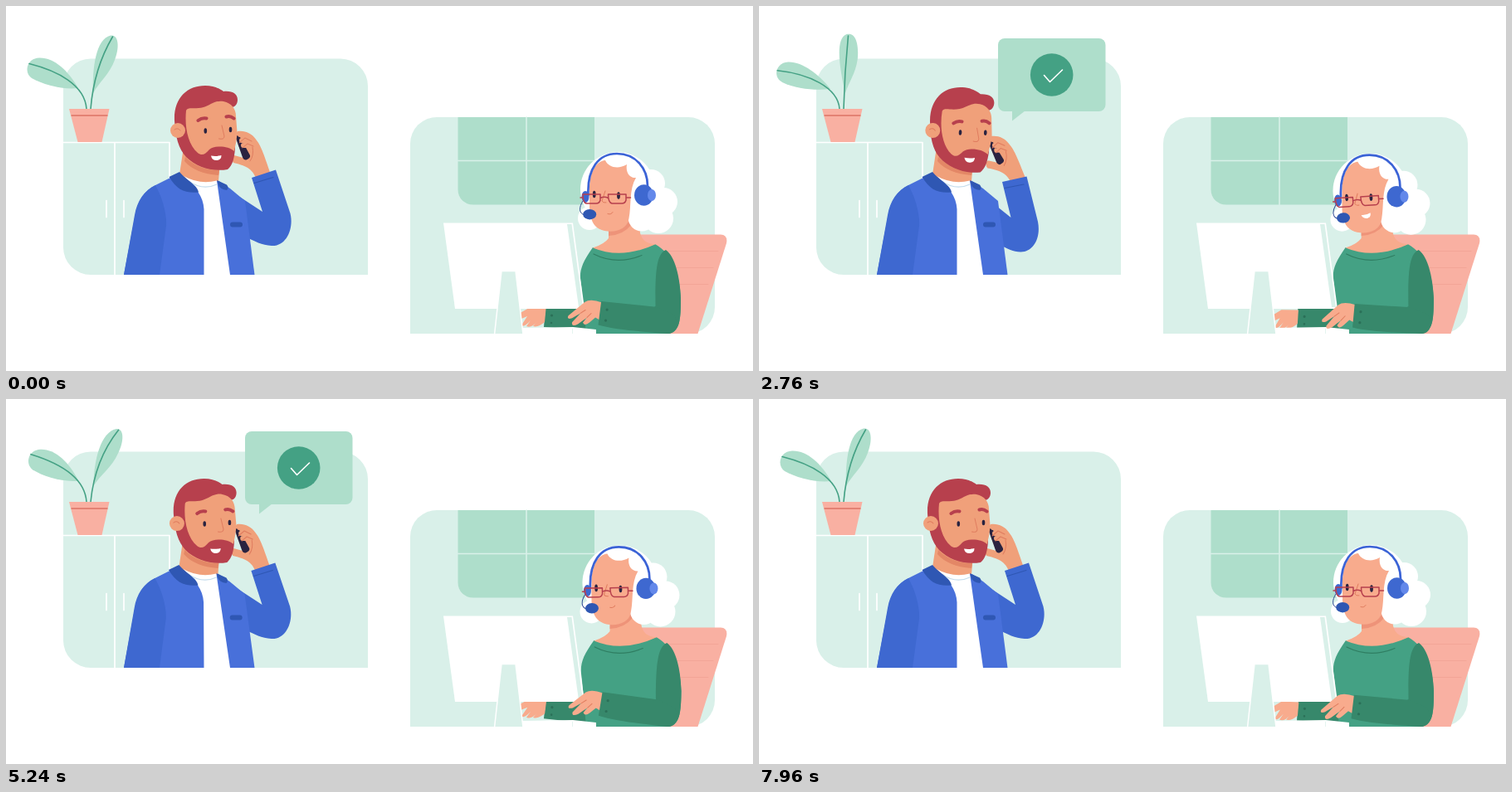
Animation of 900x440 px, one loop 8 s. Source, as an HTML page:

```html
<!DOCTYPE html>
<html lang="en">
<head>
<meta charset="utf-8">
<title>Support call</title>
<style>
html, body { margin: 0; width: 100%; height: 100%; overflow: hidden; background: #fff; }
svg { display: block; width: 900px; height: 440px; }
.line { fill: none; stroke-linecap: round; stroke-linejoin: round; }
.mint { fill: #d9f0e9; }
.leaf { fill: #aedecb; }
.rib { stroke: #44a184; stroke-width: 1.6; }
.coral { fill: #f9b0a2; }
.blue { fill: #4870da; }
.sleeve { fill: #3e68d0; }
.navy { fill: #2f57b3; }
.skin { fill: #f0a07a; }
.red { fill: #b7404d; }
.crease { stroke: #df7c5f; stroke-width: 1; }
.ink { fill: #2a2340; }
.green { fill: #44a184; }
.dark { fill: #37886b; }
.peach { fill: #f8ab8d; }
.white { fill: #fff; }
</style>
</head>
<body>
<svg viewBox="0 0 900 440">
  <!-- left room -->
  <path class="mint" d="M102 63.5H403a33 33 0 0 1 33 33V324H102a33 33 0 0 1-33-33V96.500a33 33 0 0 1 33-33Z"/>
  <path class="line" stroke="#fff" stroke-width="1.7" d="M69 164.500H197V324M131 164.500V324M121 234.500V254.500M142 234.500V254.500"/>
  <path class="leaf" id="leafL"/>
  <path class="line rib" id="ribL"/>
  <path class="leaf" id="leafR"/>
  <path class="line rib" id="ribR"/>
  <path class="coral" d="M76 124H124.500L115.500 164H86.500Z"/>
  <path class="line" stroke="#dd7465" stroke-width="1.4" d="M79 132H122"/>

  <!-- caller -->
  <g id="man">
    <g id="hand">
      <path class="skin" d="M302 210C298 198 292 193 274 189Q270 183 275 180L286 183L280 168Q275 154 279 151C288 150 296 153 302 162C308 170 311 180 319 203Z"/>
      <path class="ink" d="M276.500 158Q277 155.500 281 156L294 180Q295 183 289.500 185.500Q286 186 284.500 181Z"/>
      <path class="line" stroke="#f0a07a" stroke-width="6" d="M282 155L293 158M284 162L296 163M286 168L297 168"/>
      <path class="line crease" d="M281 165L288 159L296 163M285 171L291 166L298 169M297 170Q299 180 294 187"/>
    </g>
    <path class="sleeve" id="arm"/>
    <path class="line" id="cuff" stroke="#2f57b3" stroke-width="1.2"/>
    <path class="blue" d="M142 324L156 250C160 232 168 222 180 216L208 202L255 210L270 220L288 235L299.500 324Z"/>
    <path class="skin" d="M214 170L209 203Q231 220 256 211L258 188Z"/>
    <path fill="#e38766" d="M216 182Q232 198 257 198L256 204Q228 202 215 187Z"/>
    <path class="sleeve" d="M142 324L155 252C158 235 166 223 180 216C188 230 194 250 193 265L185 324Z"/>
    <path class="white" d="M214 205Q234 216 254 210.500L270 324H238.500V245C238 230 228 217 214 205Z"/>
    <path class="line" stroke="#c4dcec" stroke-width="1.2" d="M220 211Q237 223 254 215"/>
    <path class="navy" d="M196.500 206L209 200C217 210 231 216 232 224.500C216 226 206 222 196.500 206Z"/>
    <path class="navy" d="M254 210L266 215.500Q269 219 266 222Q258 221 256 216Z"/>
    <rect class="navy" x="270" y="260.500" width="15" height="6" rx="3"/>
    <g id="head">
      <path class="red" d="M203 138C202 111 218 96 240 96C251 96 258 100 262 103C273 102 279 106 279 113C279 119 275 122 272 122L276 172C275 184 273 192 267 197C250 200 230 195 217 182C208 172 204 158 203 138Z"/>
      <path class="skin" d="M217 126C219 121 227 125 238 122C246 120 252 113 262 115C272 117 277 124 277 133L278.500 152C278 163 276 169 275 175C267 168 251 168 245 173C240 179 236 181 231 177C219 167 215 145 217 126Z"/>
      <circle class="skin" cx="207" cy="150" r="9"/>
      <path class="line crease" d="M203 149Q207 146 210 150"/>
      <path class="line" id="brows" stroke="#b7404d" stroke-width="4" d="M231.500 138Q236 134.500 241.500 135.500M265.500 133.500Q270 132 274.500 135.500"/>
      <ellipse class="ink" cx="240.300" cy="150.500" rx="1.8" ry="3.200"/>
      <ellipse class="ink" cx="270.500" cy="149" rx="1.8" ry="3.200"/>
      <path class="line crease" d="M260 144L263 157Q263 161.500 256.500 160"/>
      <path class="white" id="smile" d="M247 180.500Q253 181.500 259.500 180Q259.500 186 253.500 186Q248 186 247 180.500Z"/>
      <path fill="#e8896f" id="speak" d="M247 182Q254 180.500 260 183.500Q258 186 254 185.500Q250 185 247 182Z"/>
    </g>
  </g>

  <!-- speech bubble -->
  <g id="bubble">
    <rect class="leaf" x="288" y="39" width="129.500" height="88" rx="8"/>
    <path class="leaf" d="M305 126V138.500L321 126Z"/>
    <circle class="green" cx="352.700" cy="83" r="25.800"/>
    <path class="line" stroke="#fff" stroke-width="1.6" d="M343.500 83.500L350.500 91.500L365.500 77"/>
  </g>

  <!-- right room -->
  <path class="mint" d="M519 134H822a32 32 0 0 1 32 32V363a32 32 0 0 1-32 32H487V166a32 32 0 0 1 32-32Z"/>
  <path class="leaf" d="M544.500 134H709V239.500H562.500a18 18 0 0 1-18-18Z"/>
  <path class="line" stroke="#d9f0e9" stroke-width="1.6" d="M627 134V239.500M544.500 186.500H709"/>
  <path class="coral" d="M740 275.500H861Q870 276 868 286L833.500 395H740Z"/>
  <path class="line" stroke="#f3a597" stroke-width="1" d="M780 295.500H858M800 315.500H852M805 335.500H846"/>

  <!-- agent -->
  <g id="backArm">
    <path class="dark" d="M650 363L702 364V391L648 387Z"/>
    <path class="peach" d="M650.500 365L630 364L616 372L614 380L628 374L621 385Q624 388 632 379L627 386Q633 389 640 380L635 386Q641 388 649 381Z"/>
    <circle cx="657.500" cy="373" r="1.600" fill="#2b7058"/>
    <circle cx="657" cy="382" r="1.300" fill="#2b7058"/>
  </g>
  <g id="hairBack" class="white">
    <circle cx="737" cy="221" r="45"/>
    <circle cx="703" cy="256" r="14"/>
    <circle cx="777" cy="214" r="17"/>
    <circle cx="792" cy="236" r="17"/>
    <circle cx="786" cy="256" r="18"/>
  </g>
  <g id="torso">
    <path class="green" d="M707 291C693 311 690 320 693 337L699 395H797C812 394 813 378 813 352C812 326 804 299 782 287Q742 304 707 291Z"/>
    <path class="dark" d="M795 294C784 299 782 318 782.500 362L750 380L797 395C812 394 813 378 813 352C812 326 806 302 795 294Z"/>
    <path class="peach" d="M726 256V280Q721 287 707 291.500Q742 306 783 287Q765 287 763.500 270L757 250Z"/>
    <path fill="#ee9379" d="M726 268Q742 270 752 258L753 264Q744 276 726 277Z"/>
    <path class="line" stroke="#2f7e62" stroke-width="1.2" d="M708 299Q736 313 766 300.500"/>
  </g>
  <g id="face">
    <path class="white" d="M745 190Q772 190 771 220Q774 264 752 262Z"/>
    <circle class="white" cx="766" cy="255" r="16.500"/>
    <path class="peach" d="M703 222C703 200 711 187 722 186C726 195 738 197 748 191C746 202 753 208 759 207C750 222 754 242 750 258C748 268 735 274 721 271C708 268 703 258 703 240Z"/>
    <path class="line" stroke="#3b63d6" stroke-width="2.700" d="M701.500 228C700 196 714 178 736 178C759 178 773 196 773 217"/>
    <ellipse class="sleeve" cx="768.500" cy="228" rx="11.500" ry="12.700"/>
    <ellipse cx="778" cy="228" rx="5" ry="7" fill="#6388ea"/>
    <g id="features">
      <ellipse class="sleeve" cx="698" cy="230" rx="4.500" ry="7"/>
      <path class="line" stroke="#2f4b95" stroke-width="1" d="M695 235C690 243 690 250 697 252"/>
      <ellipse class="navy" cx="703.200" cy="251.200" rx="8" ry="6.200"/>
      <ellipse class="ink" cx="708.700" cy="227" rx="1.900" ry="4.300"/>
      <ellipse class="ink" cx="738" cy="228.500" rx="1.900" ry="4.300"/>
      <path class="line crease" d="M722 223L718 235Q719 237.500 723 237"/>
      <path class="line" stroke="#b7404d" stroke-width="1.500" d="M695 227H716V234Q715 238 711 238H699Q695 237 695 227ZM725.500 227H747V234Q746 238 742 238H730Q725.500 237 725.500 227ZM716 231.500Q721 229 725.500 231.500M747 231H752.500M692 231H695"/>
      <path class="line crease" id="calm" d="M725 250.500Q729 252 731 248.500"/>
      <path class="white" id="grin" d="M725 249Q731 250 736 247Q737 252 732 253.500Q727 254 725 249Z"/>
    </g>
  </g>

  <!-- desk -->
  <path class="white" d="M622 388L683 387L711 390V396H622Z"/>
  <path class="line" stroke="#e5f4ef" stroke-width="1" d="M682.500 389V395"/>
  <path class="white" d="M527 261.500H683L697 365H541Z"/>
  <path class="mint" d="M676 263H681.500L695 363H690Z"/>
  <path class="mint" stroke="#fff" stroke-width="1.500" d="M597 319.500H614L623 396H588.500Z"/>
  <g id="frontArm">
    <path class="peach" d="M718 358Q704 353 697 357.500L677.500 374Q675 379 682 377L692 371L682 382Q681 388 689 384L700 376L695 382Q697 387 703 382L710 376L717 380Z"/>
    <path class="line crease" d="M692 371L698 367M700 376L705 371"/>
    <path class="dark" d="M717 356.500L785 363L805 372C811 385 806 395 797 395C770 393 735 391 713.500 385Z"/>
    <circle cx="724" cy="366.500" r="1.600" fill="#2b7058"/>
    <circle cx="722.500" cy="379.500" r="1.600" fill="#2b7058"/>
  </g>
  <path class="white" d="M580 395H840V400H580Z"/>
</svg>
<script>
const LOOP = 8000;
const el = id => document.getElementById(id);
const move = (id, value) => el(id).setAttribute('transform', value);
const show = (id, on) => { el(id).style.display = on ? '' : 'none'; };

// Cosine easing between [time, value] keys.
function track(t, keys) {
  let i = 1;
  while (i < keys.length - 1 && t > keys[i][0]) i++;
  const [t0, a] = keys[i - 1], [t1, b] = keys[i];
  return a + (b - a) * (1 - Math.cos(Math.PI * (t - t0) / (t1 - t0))) / 2;
}

// Sets a path between two outlines that share the same commands.
function morph(id, [a, b], k) {
  const target = b.match(/[\d.]+/g);
  let i = 0;
  el(id).setAttribute('d', a.replace(/[\d.]+/g, n => (+n + (target[i++] - n) * k).toFixed(2)));
}

const lean = (angle, y) => `translate(0 ${y}) skewX(${angle}) translate(0 ${-y})`;

function bubbleScale(t) {
  if (t < 1000 || t >= 7300) return 0;
  if (t < 1500) {
    const u = (t - 1000) / 500 - 1, s = 2.4;
    return 1 + (s + 1) * u ** 3 + s * u ** 2;
  }
  return t < 7000 ? 1 : 1 - ((t - 7000) / 300) ** 3;
}

const PLANT = {
  leafL: ['M87 99C75 78 58 62 40 62.5C25 63 21 80 31 87C45 95 68 101 87 99Z',
          'M86 100C72 82 52 67 35 67.5C20 68 16 86 28 92C45 100 68 102 86 100Z'],
  ribL: ['M28 69.5C62 78 95 95 97 124', 'M22 78C60 82 95 98 97 124'],
  leafR: ['M105 105C104 75 108 40 126 35.5C136 34 137 50 131 65C125 82 112 92 105 105Z',
          'M104 105C98 80 90 40 105 34C117 31 120 48 118.5 64C116 82 108 92 104 105Z'],
  ribR: ['M102 124Q106 75 128.500 37', 'M102 124Q103 80 107 36']
};
const ARM = ['M270 224L283 231L309 248L296 207L325 197.5L342.5 250C347 268 338 290 320 289C308 288 300 284 288 278Z',
             'M270 230L286 241L303.5 255L293 212L322.500 205.5L336 260C340 280 330 297 315 296.500C306 296 300 293 290 288Z'];
const CUFF = ['M299 213.500L322 206.500', 'M296 219.500L319 215'];

function draw(t) {
  const droop = track(t, [[0, 0], [2500, 1], [5700, -.4], [8000, 0]]);
  for (const id in PLANT) morph(id, PLANT[id], droop);

  const nod = track(t, [[0, 0], [1760, 1], [2800, 1], [4350, 0], [8000, 0]]);
  const tilt = track(t, [[0, 0], [4300, 0], [6400, .72], [8000, 0]]);
  move('man', lean(tilt, 324));
  move('head', `translate(${-.6 * nod} ${1.6 * nod}) rotate(${3.3 * nod - .6 * tilt} 235 200)`);
  move('brows', `translate(0 ${1.8 * nod})`);
  move('hand', `translate(${2 * nod} ${4.5 * nod}) rotate(${-3 * nod} 310 202)`);
  morph('arm', ARM, nod);
  morph('cuff', CUFF, nod);
  const beat = t % 640, talking = beat > 360 && beat < 600;
  show('smile', !talking);
  show('speak', talking);

  move('bubble', `translate(306 138) scale(${bubbleScale(t)}) translate(-306 -138)`);

  const shift = track(t, [[0, 0], [550, 2.2], [1760, -3.2], [2760, -.3], [3500, 2.8], [4320, 2.3],
    [5240, 1.4], [5850, 2.4], [6400, 1.4], [8000, 0]]);
  const bow = track(t, [[0, 0], [1600, 1], [2800, 1], [4320, .8], [5400, .2], [6400, 0], [8000, 0]]);
  move('torso', lean(-Math.atan(shift / 105) * 180 / Math.PI, 395));
  for (const id of ['hairBack', 'face']) move(id, `translate(${1.75 * shift} ${1.7 * bow})`);
  move('features', `rotate(${-3.5 * bow} 745 230)`);
  const happy = t > 1300 && t < 3600;
  show('grin', happy);
  show('calm', !happy);

  const typing = Math.sin(t / 1000 * 2 * Math.PI);
  move('frontArm', `translate(${1.5 * bow} 0) rotate(${.3 + 2 * typing} 797 385)`);
  move('backArm', `rotate(${1.8 * typing} 702 385)`);
}

function frame() {
  draw(performance.now() % LOOP);
  requestAnimationFrame(frame);
}
frame();
</script>
</body>
</html>
```
